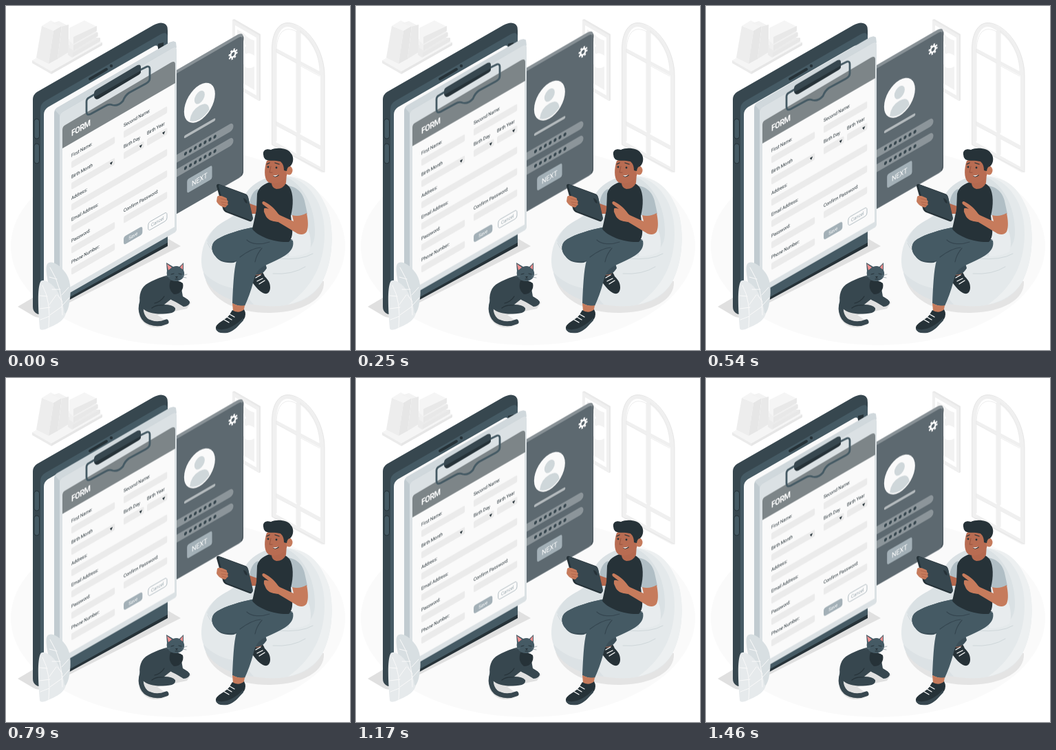
Write an HTML page that moves like this. It is 500 px wide and 500 px high and loops after 1.5 s.

```html
<!DOCTYPE html>
<html lang="en">
<head>
<meta charset="utf-8">
<title>Form</title>
<style>
html, body { margin: 0; width: 100%; height: 100%; overflow: hidden; background: #fff; }
svg { display: block; width: 100vw; height: 100vh; }
text { font-family: Roboto, "Open Sans", sans-serif; }
.float { animation: float 1.5s linear infinite; }
@keyframes float { 50% { transform: translateY(-10px); } }
.line { fill: none; stroke-linecap: round; stroke-linejoin: round; }
.label { font-size: 7px; fill: #263238; letter-spacing: -.08px; }
.field { fill: #ebebeb; }
</style>
</head>
<body>
<svg viewBox="0 0 500 500">
  <ellipse cx="250" cy="349" rx="243" ry="144" fill="#fafafa"/>

  <g id="window" class="line" stroke="#f0f0f0">
    <path d="M389.500 200V64C389.500 36 401 21 419 30C444 42 460 70 460 102V239Z" stroke-width="6"/>
    <path d="M425 34V220M392 64L458 99M392 170L458 206" stroke-width="5"/>
    <path d="M386.500 201V62C387 34 400 18 421 27C446 38 463 70 463 102V241Z" stroke="#e6e6e6" stroke-width="1"/>
    <path d="M393 196V66C393 40 404 27 422 37M428 37C446 49 456 73 456 96M428 36V80M422 37V77M422 83V181M428 87V184M422 189V213M428 193V216M393 67L422 83M428 87L456 102M393 174L422 189M428 193L456 208" stroke="#e9e9e9" stroke-width=".8"/>
  </g>

  <g id="picture">
    <path d="M329 20L332 19L370 41V137L368 138L329 115Z" fill="#e9e9e9"/>
    <path d="M329 20L368 43V138L329 115Z" fill="#f0f0f0"/>
    <path d="M333 28L364 46V130L333 112Z" fill="#fff"/>
    <path d="M336 34L346 40Q352 48 361 50V72Q352 66 349 70Q342 64 349 58Q344 46 336 44ZM336 82Q343 78 348 89Q354 92 361 88V122L336 107Z" fill="#f2f2f2"/>
  </g>

  <g id="shelf">
    <path d="M38 79L111 37L140 53L66 95Z" fill="#f5f5f5"/>
    <path d="M38 79L66 95V99L38 83Z" fill="#ebebeb"/>
    <path d="M66 95L140 53V57L66 99Z" fill="#e6e6e6"/>
    <path d="M52 29L65 21L81 29L69 36Z" fill="#f5f5f5"/>
    <path d="M52 29L69 36L62 84L44 75Z" fill="#ededed"/>
    <path d="M69 36L81 29L75 77L62 84Z" fill="#e6e6e6"/>
    <path d="M66 25L77 22L91 29V67L75 77L81 30Z" fill="#f3f3f3"/>
    <path d="M81 30L91 27V67L75 77Z" fill="#e9e9e9"/>
    <path d="M90 58L112 46L136 46V52L96 75L90 71Z" fill="#ebebeb"/>
    <path d="M92 43L116 29L134 39V44L98 65L92 61Z" fill="#f0f0f0"/>
    <path d="M92 32L114 21L132 30V36L97 55L92 51Z" fill="#f5f5f5"/>
    <path d="M98 45L132 29V36L98 55ZM98 57L133 38V44L98 65ZM97 68L137 46V51L97 74Z" fill="#e8e8e8"/>
  </g>

  <g id="login" class="float">
    <path d="M236 100L336 42Q345 37 345 46V240Q345 246 339 250L236 309Z" fill="#858e93" opacity=".97"/>
    <path d="M236 105L337 46.500Q343 43 343.500 47V241Q343 247 338 250L236 309Z" fill="#5d6970"/>
    <path d="M344 44Q346 43 345 51V240Q345 245 341 248L343.500 241Z" fill="#465259"/>
    <g transform="matrix(.866 -.5 0 1 248 0)">
      <g transform="translate(94.700 117.400)" class="line" stroke="#fff">
        <circle r="4.200" stroke-width="2.700"/>
        <circle r="6.400" stroke-width="2.500" stroke-dasharray="2.500 2.526" stroke-linecap="butt"/>
      </g>
      <circle cx="38.500" cy="160" r="26" fill="#fafafa"/>
      <circle cx="38.500" cy="152" r="8.700" fill="#cfd7da"/>
      <path d="M22 178Q24 164 38.500 164T55 178Q47 184 38.500 184T22 178Z" fill="#cfd7da"/>
      <path class="line" d="M14.500 197H63" stroke="#b4babd" stroke-width="4"/>
      <g class="line" stroke="#8c959a" stroke-width="11.500">
        <path d="M-8 222H89.500M-8 243H89.500"/>
        <path d="M15 222H64.500M15 243H64.500" stroke="#37474f" stroke-width="5" stroke-dasharray="0 8.200"/>
      </g>
      <rect x="17.500" y="261" width="42" height="20" rx="3" fill="#a3b0b7"/>
      <text x="38.500" y="275" font-size="10.500" text-anchor="middle" fill="#fff">NEXT</text>
    </g>
  </g>

  <g id="phone">
    <path d="M17 437L39 424L230 335L254 349L51 452Q45 454 39 450Z" fill="#e0e0e0"/>
    <path d="M39 136Q39 129 45 125L214 28Q225 22 231 26Q235 28 235 36V348L54 447Q48 450 43 446Q39 443 39 437Z" fill="#37474f"/>
    <path d="M50 150Q50 142 57 138L225 41Q235 36 235 46V344L57 444Q50 448 50 440Z" fill="#455a64"/>
    <path d="M235 344V349L54 448Q49 449 50 440Q50 445 57 443Z" fill="#263238"/>
    <path d="M221 55L229 53V70H221Z" fill="#263238"/>
    <path d="M55 158Q55 151 61 147L214 59Q221 55 221 62V325L55 421Z" fill="#fafafa"/>
    <path class="line" d="M122 106L146 92" stroke="#263238" stroke-width="4"/>
    <circle cx="153" cy="87" r="2.200" fill="#263238"/>
    <g fill="#455a64" stroke="#263238" stroke-width="1">
      <rect x="41" y="164" width="7.500" height="29" rx="3.700"/>
      <rect x="41" y="200" width="7.500" height="29" rx="3.700"/>
    </g>
  </g>

  <g id="clipboard" class="float">
    <path d="M70 156Q70 151 74 148L238 53Q244 50 247 53L248 325L80 423Q70 426 70 418Z" fill="#c1cbd0"/>
    <path d="M78 161Q78 156 82 154L242 61Q248 58 248 64V324Q248 328 244 330L84 422Q78 425 78 419Z" fill="#dbe1e4"/>
    <path d="M71 151L74 148L238 53Q244 50 247 53L248 61Q246 59 242 61L82 154L78 159Z" fill="#d0d8dc"/>
    <path d="M82 180Q82 175 86 173L240 84Q245 81 245 86V321L82 415Z" fill="#fafafa"/>
    <path d="M82 207V180Q82 175 86 173L240 82Q246 79 246 85V112Z" fill="#7d8588"/>
    <g class="line" stroke="#455a64" stroke-width="2.800">
      <path d="M131 127L121 133Q117 135 117 139V153Q117 160 123 157L145 145Q150 142 155 144Q163 146 170 138Q173 130 179 126L203 113Q209 110 209 105V92Q209 86 203 89L195 93"/>
    </g>
    <path d="M128 127Q128 123 132 121L191 86Q196 84 196 89V94Q196 97 193 99L135 133Q129 137 128 132Z" fill="#37474f"/>
    <path d="M133 130L194 95Q196 93 196 96Q196 98 193 100L136 134Q130 138 129 132Z" fill="#263238"/>
    <g transform="matrix(.866 -.5 0 1 95 0)">
      <text y="189.500" font-size="12.500" font-weight="700" fill="#fff" letter-spacing="-.7">FORM</text>
      <g class="label">
        <text y="220">First Name:</text><text x="87.800" y="220">Second Name:</text>
        <text y="251">Birth Month</text><text x="87.800" y="251">Birth Day</text><text x="127" y="251">Birth Year</text>
        <text y="282">Address:</text>
        <text y="313">Email Address:</text>
        <text y="344">Password:</text><text x="87.800" y="344">Confirm Password:</text>
        <text y="375">Phone Number:</text>
      </g>
      <g class="field">
        <rect y="226" width="73" height="10" rx="2"/><rect x="87.800" y="226" width="73" height="10" rx="2"/>
        <rect y="257" width="73" height="10" rx="2"/><rect x="87.800" y="257" width="34" height="10" rx="2"/><rect x="127" y="257" width="34" height="10" rx="2"/>
        <rect y="288" width="160.800" height="10" rx="2"/>
        <rect y="319" width="160.800" height="10" rx="2"/>
        <rect y="350" width="73" height="10" rx="2"/><rect x="87.800" y="350" width="73" height="10" rx="2"/>
        <rect y="381" width="73" height="10" rx="2"/>
      </g>
      <path d="M64.500 260.500h5l-2.500 4zM114 260.500h5l-2.500 4zM152.500 260.500h5l-2.500 4z" fill="#263238"/>
      <g font-size="7" text-anchor="middle">
        <rect x="87.800" y="379.500" width="31.500" height="12" rx="3.500" fill="#a3b0b7"/>
        <text x="103.500" y="388" fill="#fff">Save</text>
        <rect x="129" y="379.500" width="31.500" height="12" rx="3.500" fill="#fafafa" stroke="#a3b0b7" stroke-width=".8"/>
        <text x="144.700" y="388" fill="#9aa8af">Cancel</text>
      </g>
    </g>
  </g>

  <g id="plant">
    <path d="M74 452C68 425 54 384 60 375C67 367 82 380 88 390C95 401 95 420 91 437C88 448 82 455 72 458Z" fill="#d8dfe2"/>
    <path d="M49 468C47 445 45 411 50 401C54 394 70 405 76 417C81 427 84 436 85 446L87 447C83 460 70 464 57 470Q49 472 49 468Z" fill="#e6eaec"/>
    <g class="line" stroke="#fafafa" stroke-width="1">
      <path d="M64 380Q83 410 82 449M74 397L63 394M79 412L67 412M82 430L75 420M81 420L91 409M82 435L92 424"/>
      <path d="M53 406Q66 430 62 467M60 422L49 421M64 438L49 440M63 451L50 456M63 434L73 420M64 449L81 437"/>
    </g>
  </g>

  <g id="beanbag">
    <path d="M290 398C300 430 340 447 385 446C430 445 464 427 462 400Z" fill="#e4e4e4"/>
    <path d="M343 286C348 264 371 247 402 247C435 247 460 270 470 305C478 340 472 378 459 402C442 432 405 440 366 435C321 430 285 406 284 372C284 347 293 328 314 315C328 307 339 302 343 286Z" fill="#e4e9eb"/>
    <path d="M415 249C447 260 464 295 463 333C462 375 446 408 410 434Q444 426 459 402C472 378 478 340 470 305C460 270 440 250 415 249Z" fill="#edf0f1"/>
    <path d="M343 286C348 264 371 247 402 247C424 252 448 282 449 325C450 350 438 361 416 363L318 357C305 355 295 349 292 341Q300 323 314 315C328 307 339 302 343 286Z" fill="#dae1e4"/>
    <path d="M414 290C436 307 448 338 441 357Q430 364 411 364Z" fill="#e8ecee"/>
    <path class="line" d="M293 345Q298 360 327 366M395 367Q429 370 446 360M388 389Q416 391 435 379" stroke="#cfd7da" stroke-width="1"/>
    <path d="M287 387Q305 408 342 412L360 434C321 431 290 411 287 387Z" fill="#dce2e5"/>
  </g>

  <g id="man">
    <path d="M359 383C367 380 374 386 376 393C381 398 384 402 384 409C384 415 381 419 376 418C369 416 363 408 359 403C357 397 359 391 359 383Z" fill="#263238"/>
    <path class="line" d="M363 395L370 391M365 400L373 396M368 404L376 399" stroke="#fff" stroke-width="1.300"/>
    <path d="M357 377L371 376L372 389Q366 394 360 390Z" fill="#b5694f"/>
    <path d="M362 321C341 325 318 332 307 339C297 345 298 356 304 363C309 371 317 374 331 373L361 360L371 354L379 381C373 391 365 393 355 388L351 380L365 350L417 340Z" fill="#3c4f59"/>
    <path d="M362 321C341 325 318 332 307 339C297 345 298 356 304 363C311 372 326 373 341 368L384 349Z" fill="#455a64"/>
    <path d="M359 322L417 341C421 360 397 367 373 379Q363 385 360 399C356 415 351 427 347 436Q337 437 329 432C330 409 331 384 335 370C340 358 362 351 378 345Z" fill="#455a64"/>
    <path class="line" d="M383 343C371 347 357 347 350 340M340 365Q357 352 370 351M372 352Q364 361 362 372" stroke="#354650" stroke-width="1.200"/>
    <path d="M329 432Q338 437 347 435L345 446Q336 449 330 443Z" fill="#c67b5c"/>
    <path d="M329 442Q338 448 346 441Q350 448 346 455C338 462 333 471 322 474C314 476 305 474 305 468C305 461 318 457 324 450Z" fill="#263238"/>
    <path d="M305 468C315 474 332 467 345 453V457C337 465 333 472 322 475Q306 477 305 468Z" fill="#37474f"/>
    <path class="line" d="M317 456L324 460M321 452L328 456M325 448L332 452" stroke="#fff" stroke-width="1.400"/>

    <path d="M366 266C358 269 355 279 354 288L367 294L373 274Z" fill="#b0bec5"/>
    <path d="M354 287L365 291L363 302L353 302Z" fill="#b5694f"/>
    <path d="M409 261C425 263 433 274 435 288L438 302Q428 308 414 304L407 284Z" fill="#b0bec5"/>
    <path d="M386 255C376 258 367 263 365 273L364 296L358 324C366 335 390 344 411 343C419 335 416 322 414 305C418 290 418 272 412 263Q407 257 398 255Z" fill="#263238"/>
    <path d="M387 250L408 243L407 257Q403 266 393 266Q386 264 386 257Z" fill="#b5694f"/>
    <path d="M416 304Q426 307 437 301C439 311 440 321 437 328Q433 334 424 331L394 313C384 314 377 308 376 300Q381 297 390 298L398 304L418 313Z" fill="#c67b5c"/>
    <path d="M397 304C391 295 385 289 375 284Q371 284 373 288L382 295Q374 292 375 296Q374 300 378 304Q383 313 395 314Z" fill="#c67b5c"/>

    <path d="M306 262Q306 258 310 259L348 273Q351 274 352 278L358 309Q358 314 354 313L320 300Q316 298 315 294Z" fill="#263238"/>
    <path d="M309 262Q309 259 312 260L348 274Q351 275 352 278L359 308Q359 313 355 311L323 299Q319 298 318 294Z" fill="#37474f"/>
    <path d="M345 279Q350 280 351 287Q346 286 345 279Z" fill="#263238"/>
    <path d="M307 277Q310 274 318 278Q322 279 321 282Q324 284 322 286Q324 289 321 290Q320 294 315 292Q308 289 306 284Z" fill="#c67b5c"/>
    <path class="line" d="M312 280L320 282M313 285L321 286M314 288L320 290" stroke="#a95c44" stroke-width=".7"/>

    <path d="M379 225C375 236 375 250 380 255C385 260 398 259 405 251Q409 246 410 240L407 223Q394 218 379 225Z" fill="#b86c52"/>
    <ellipse cx="411.500" cy="239" rx="5" ry="6.500" fill="#c67b5c"/>
    <path d="M374 216C373 209 379 207 385 209C393 205 410 206 414 214C419 219 418 229 413 233Q409 233 408 240L404 239C404 232 402 229 399 226C391 224 383 226 377 223Q374 220 374 216Z" fill="#263238"/>
    <g class="line" stroke="#263238" stroke-width="1.300">
      <path d="M379 230L383 228M391 228L397 230M389 247Q392 249 396 246"/>
      <path d="M385 233L383 242L387 242" stroke="#91503c" stroke-width=".9"/>
    </g>
    <path d="M388 246Q391 250 396 245Q392 247 388 246Z" fill="#fff"/>
    <circle cx="381" cy="234" r="1.400" fill="#263238"/><circle cx="393" cy="235" r="1.400" fill="#263238"/>
  </g>

  <g id="cat">
    <path d="M194 452C205 472 224 469 237 461L220 449L263 440L269 431L248 423L201 428Z" fill="#e0e0e0"/>
    <path class="line" d="M198 429C193 444 199 457 210 460Q221 464 233 459" stroke="#37474f" stroke-width="7"/>
    <path d="M236 391C226 394 207 400 200 408C193 416 192 432 199 440C208 448 224 449 241 446Q247 444 246 439Q242 434 230 434L240 426L258 437Q266 437 267 430Q264 426 257 422L254 405L247 395Z" fill="#37474f"/>
    <path d="M239 399Q250 398 257 403C259 411 254 419 244 419C238 414 236 408 239 399Z" fill="#263238"/>
    <path d="M232 422Q244 419 257 423Q266 426 267 431Q266 436 258 435L242 428Z" fill="#37474f"/>
    <path d="M216 432Q225 430 230 422M229 435Q218 434 212 439" class="line" stroke="#263238" stroke-width="1.200"/>
    <path d="M233 373L243 379Q248 377 252 379L258 373L258 384C262 393 255 400 247 400C238 400 232 393 234 385Z" fill="#455a64"/>
    <path d="M234 375L241 380L236 384ZM257 375L253 380L257 383Z" fill="#f28f8f"/>
    <path d="M246 393L250 393L248 396Z" fill="#263238"/>
    <path class="line" d="M240 390L244 389M251 389L255 390M246 397L250 397" stroke="#263238" stroke-width="1"/>
    <path class="line" d="M256 392L263 390M256 394L262 395M238 393L231 393" stroke="#78868d" stroke-width=".6"/>
  </g>
</svg>
</body>
</html>
```
